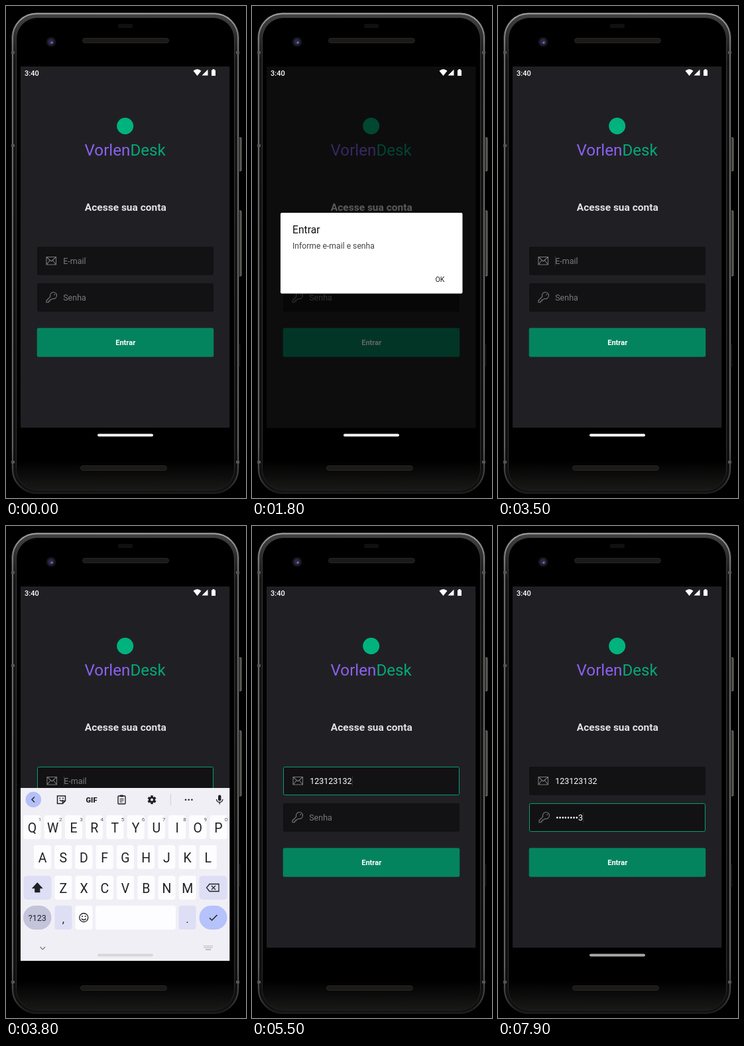
An HTML page with a canvas for the animation above (8000 ms loop, 362x740 px).

```html
<!DOCTYPE html>
<html lang="pt-BR">
<head>
<meta charset="utf-8">
<title>Login</title>
<style>
html, body { margin: 0; width: 100%; height: 100%; overflow: hidden; background: #000; }
canvas { display: block; }
</style>
</head>
<body>
<canvas id="stage" width="362" height="740"></canvas>
<script>
const c = document.getElementById('stage').getContext('2d');
const LOOP = 8000, STEP = 100;
const SCREEN = { x: 22, y: 91, w: 315.5, h: 543.5 };
const KB = { x: 22, y: 394, w: 315.5, h: 260 };
const GREEN = '#00b37e', INK = '#202127';

const clamp = v => Math.max(0, Math.min(1, v));
const ramp = (t, a, b) => clamp((t - a) / (b - a));
const easeOut = p => 1 - (1 - p) ** 2;
const mix = (a, b, p) => a + (b - a) * p;

function box(x, y, w, h, r, fill, stroke, lw = 1) {
  c.beginPath();
  c.roundRect(x, y, w, h, r);
  if (fill) { c.fillStyle = fill; c.fill(); }
  if (stroke) { c.strokeStyle = stroke; c.lineWidth = lw; c.stroke(); }
}

function disc(x, y, r, fill) {
  c.beginPath();
  c.arc(x, y, r, 0, 7);
  c.fillStyle = fill;
  c.fill();
}

function path(d, stroke, lw = 1.2, fill) {
  const p = new Path2D(d);
  if (fill) { c.fillStyle = fill; c.fill(p); }
  if (stroke) { c.strokeStyle = stroke; c.lineWidth = lw; c.stroke(p); }
}

function text(s, x, y, size, color, weight = 400, align = 'left') {
  c.font = `${weight} ${size}px Roboto, Arial, sans-serif`;
  c.textAlign = align;
  c.fillStyle = color;
  c.fillText(s, x, y);
}

function clipTo(r, draw) {
  c.save();
  c.beginPath();
  c.rect(r.x, r.y, r.w, r.h);
  c.clip();
  draw();
  c.restore();
}

function fade(...stops) {
  const g = c.createLinearGradient(0, 10, 0, 734);
  for (const [at, color] of stops) g.addColorStop(at, color);
  return g;
}

function phone() {
  c.fillStyle = '#000';
  c.fillRect(0, 0, 362, 740);
  // side buttons
  box(350.5, 198, 4.5, 50, 1, '#4a4945', '#8a8882', .8);
  box(350.5, 308, 4.5, 98, 1, '#4a4945', '#8a8882', .8);
  box(350, 508, 3, 35, 1, '#1e1e1c');
  // metal rim, then the glass
  box(8, 10, 344, 724, 38, fade([0, '#444'], [.1, '#161616'], [1, '#101010']));
  box(10, 11.5, 340, 721, 36, null, fade([0, '#a0a09e'], [.08, '#747472'], [.9, '#6a6a68'], [.97, '#3c3c3a'], [1, '#1a1a1a']), 1.8);
  box(15.5, 17.5, 329, 711, 32, fade([0, '#000'], [.93, '#000'], [1, '#1c1c1b']),
    fade([0, '#3a3a3a'], [.9, '#303030'], [1, '#1c1c1b']), 1);
  // antenna bands
  c.fillStyle = '#555';
  for (const y of [68, 208, 684]) c.fillRect(8, y, 5, 4);
  c.fillRect(347, 68, 5, 4);
  c.fillRect(347, 684, 5, 4);
  box(169, 27, 22, 6, 2, '#101010');
  for (const [x, y] of [[115, 48], [112, 691]])
    box(x + .5, y + .5, 130, 7, 3.5, '#1b1a18', '#272623');
  disc(68, 54, 7.3, '#15151b');
  disc(68, 54, 4.6, '#2a2a45');
  disc(69, 55, 1.6, '#7a70d0');
}

function statusBar() {
  text('3:40', 28, 104.5, 11, '#fff', 500);
  path('M282.5 97.5Q288.5 92.5 294.5 97.5L288.5 105Z', null, 0, '#fff');
  path('M304.5 95.5V104.5H295.5Z', null, 0, '#fff');
  path('M310 96.5H311.5V95H314.5V96.5H316V105H310Z', null, 0, '#fff');
}

function envelope(x, y) {
  path(`M${x} ${y}h14.5v11.5h-14.5zl7.25 6.5 7.25-6.5M${x} ${y + 11.5}l5.2-6.5m4.1 0l5.2 6.5`, '#77777b', 1.1);
}

function key(x, y) {
  path(`M${x + 5.8} ${y + 4.6}A5 5 0 1 1 ${x + 8.9} ${y + 7.7}l-1.6 1.6h-2v2h-2v2h-3.3v-2.8z`, '#77777b', 1.1);
  disc(x + 12.2, y + 1.6, .9, '#77777b');
}

function field(y, icon, hint, value, focus, cursor) {
  box(47, y, 266, 42.7, 2, '#121214');
  if (focus) box(47.5, y + .5, 265, 42, 2, null, '#0c9c70', 1);
  const dx = focus ? 1 : 0, x = 86.2 + dx;
  icon(61 + dx, y + 15.5);
  text(value || hint, x, y + 26, 12.5, value ? '#fff' : '#7a7a7e');
  if (cursor) {
    const end = x + (value ? c.measureText(value).width + .5 : 0);
    c.fillStyle = '#2c2c30';
    c.fillRect(Math.round(end), y + 14, 1, 15);
  }
}

function login(s) {
  c.fillStyle = '#202024';
  c.fillRect(SCREEN.x, SCREEN.y, SCREEN.w, SCREEN.h);
  disc(179.7, 180.5, 12.5, GREEN);
  text('Vorlen', 118.5, 225, 24.2, '#8b61ee');
  const w = c.measureText('Vorlen').width;
  text('Desk', 118.5 + w, 225, 24.2, '#06a878');
  text('Acesse sua conta', 180.3, 308, 15.5, '#e1e1e6', 700, 'center');
  field(362, envelope, 'E-mail', s.email, s.focus === 'email', s.cursor === 'email');
  field(417, key, 'Senha', s.pass, s.focus === 'pass', s.cursor === 'pass');
  box(46.7, 484.3, 266.5, 43.5, 2.5, s.pressed ? GREEN : '#04845e');
  text('Entrar', 180.2, 510, 11.1, '#fff', 700, 'center');
}

function dialog(p, ripple) {
  if (!p) return;
  c.fillStyle = `rgba(0,0,0,${.6 * p})`;
  c.fillRect(SCREEN.x, SCREEN.y, SCREEN.w, SCREEN.h);
  c.save();
  c.globalAlpha = p;
  const k = mix(.94, 1, p);
  c.translate(180, 372);
  c.scale(k, k);
  c.translate(-180, -372);
  box(43, 311, 274.5, 121.5, 2, '#fff');
  if (ripple) box(262, 398, 43, 26, 2, '#dedede');
  text('Entrar', 61, 342, 15.7, '#111');
  text('Informe e-mail e senha', 61, 365, 12.2, '#444');
  text('OK', 283.5, 415, 10.7, '#222', 400, 'center');
  c.restore();
}

function toolbar() {
  disc(41.3, 411.5, 11.8, '#b4c0f8');
  path('M43 407.5l-4 4 4 4', INK, 1.4);
  // sticker
  path('M77.5 406h12v7.5l-4 4h-8zM89.5 413.5h-4v4M81 412q2.5 3 5 0', INK, 1.5);
  disc(81.3, 409.5, 1, INK);
  disc(86, 409.5, 1, INK);
  text('GIF', 129, 415.5, 11, INK, 900, 'center');
  // clipboard
  box(169, 406, 11, 12, 1, null, INK, 1.4);
  box(172, 404.5, 5, 3, 1, INK);
  path('M171.5 410.5h6M171.5 412.8h6M171.5 415h4', INK, 1);
  // gear
  for (let i = 0; i < 6; i++) {
    c.save();
    c.translate(220, 411.8);
    c.rotate(i * Math.PI / 3);
    box(-1.8, -6.5, 3.6, 4, .5, INK);
    c.restore();
  }
  disc(220, 411.8, 4.8, INK);
  disc(220, 411.8, 2, '#f1eff6');
  c.fillStyle = '#cfcfd6';
  c.fillRect(248, 403, 1, 17);
  for (const x of [271, 275.7, 280.4]) disc(x, 411.8, 1.3, INK);
  // microphone
  box(320, 404.5, 4.4, 9, 2.2, INK);
  path('M317.5 411q.5 4.5 4.7 4.5t4.7-4.5M322.2 415.5v3', INK, 1.4);
}

function keyRow(chars, x0, y, hints) {
  [...chars].forEach((ch, i) => {
    const x = x0 + i * 31.22;
    box(x - 13, y, 26, 36, 4, '#fdfdff');
    text(ch, x, y + 25.5, 19.5, INK, 400, 'center');
    if (hints) text((i + 1) % 10, x + 11.5, y + 9, 8, '#55555c', 400, 'center');
  });
}

function keyboard(s) {
  const soft = '#dedff5', fit = s.lower ? x => x.toLowerCase() : x => x;
  c.fillStyle = '#f1eff6';
  c.fillRect(KB.x, KB.y, KB.w, KB.h);
  if (s.secret) {
    for (let i = 0; i < 10; i++)
      text((i + 1) % 10, 39.5 + i * 31.22, 419, 17, INK, 400, 'center');
  } else toolbar();
  keyRow(fit('QWERTYUIOP'), 39.5, 435, !s.secret);
  keyRow(fit('ASDFGHJKL'), 55, 480);
  keyRow(fit('ZXCVBNM'), 86.4, 526);

  box(26.5, 526, 42, 36, 5, soft);
  path('M47.3 537l7 7.5h-3.6v6h-6.8v-6h-3.6z', INK, 1.3, s.lower ? null : INK);
  box(291.5, 526, 42, 36, 5, soft);
  path('M307 538.5h14v11h-14l-4.5-5.5zM310 541l6 6m0-6l-6 6', INK, 1.3);

  box(26, 571, 42.5, 36, 18, '#c3c3da');
  text('?123', 47.3, 594, 12.5, INK, 400, 'center');
  box(73.5, 571, 26, 36, 4, soft);
  text(',', 86.5, 597, 17, INK, 400, 'center');
  if (!s.secret) {
    box(104.5, 571, 26, 36, 4, '#fdfdff');
    c.beginPath();
    c.arc(117.3, 589, 6.5, 0, 7);
    c.strokeStyle = INK;
    c.lineWidth = 1.3;
    c.stroke();
    disc(115, 587, 1, INK);
    disc(119.6, 587, 1, INK);
    path('M113.8 590.5q3.5 4 7 0', INK, 1.3);
  }
  const sx = s.secret ? 104 : 135;
  box(sx, 571, 256 - sx, 36, 4, '#fdfdff');
  box(260.5, 571, 26, 36, 4, soft);
  text('.', 273.5, 597, 17, INK, 400, 'center');
  box(291.5, 571, 42, 36, 18, '#b6c2fb');
  path('M307 589.5l3.5 3.5 8-8', INK, 1.5);

  path('M51.5 633l3.8 3.8 3.8-3.8', '#77777c', 1.2);
  c.fillStyle = '#a2a2a8';
  for (let r = 0; r < 2; r++)
    for (let i = 0; i < 6; i++) c.fillRect(298.5 + i * 2.3, 631 + r * 2.6, 1.3, 1.3);
  c.fillRect(301, 636.5, 8, 1.3);
}

// Keyboard openings: [start, close start]
const OPENS = [[3500, 5300], [6200, 7300]];

function keyboardLift(t) {
  for (const [a, b] of OPENS) {
    if (t >= a && t < b) return easeOut(ramp(t, a, a + 300));
    if (t >= b && t < b + 200) return 1 - ramp(t, b - 100, b + 200) ** 1.2;
  }
  return 0;
}

function homeShade(t) {
  for (const [a, b] of OPENS) {
    if (t >= a && t < b) return mix(255, 134, ramp(t, a + 100, a + 700));
    if (t >= b && t < b + 200) return mix(134, 0, ramp(t, b - 100, b + 200));
    if (t >= b + 200 && t < b + 800) return 250 * ramp(t, b + 200, b + 800);
  }
  return 250;
}

function stateAt(t) {
  const typed = Math.round(9 * ramp(t, 3800, 4500));
  const dots = Math.round(9 * ramp(t, 6600, 7300));
  const onEmail = t >= 3500 && t < 6200, onPass = t >= 6200;
  return {
    email: '123123132'.slice(0, typed),
    pass: dots ? '•'.repeat(dots - 1) + '123123123'[dots - 1] : '',
    cursor: onEmail ? 'email' : onPass ? 'pass' : '',
    focus: t >= 3600 && onEmail ? 'email' : onPass ? 'pass' : '',
    pressed: t >= 1100 && t < 1400,
    secret: onPass,
    lower: typed > 0
  };
}

function draw(t) {
  const s = stateAt(t);
  phone();
  clipTo(SCREEN, () => {
    login(s);
    dialog(ramp(t, 1350, 1550) * (1 - ramp(t, 2500, 2700)), t >= 2500);
    statusBar();
  });
  const lift = keyboardLift(t);
  if (lift) clipTo(KB, () => {
    c.translate(0, KB.h * (1 - lift));
    keyboard(s);
  });
  const g = Math.round(homeShade(t));
  if (g) box(138, 643.5, 84, 4, 2, `rgb(${g},${g},${g})`);
}

function tick() {
  draw(Math.floor(performance.now() % LOOP / STEP) * STEP);
  requestAnimationFrame(tick);
}
tick();
</script>
</body>
</html>
```
